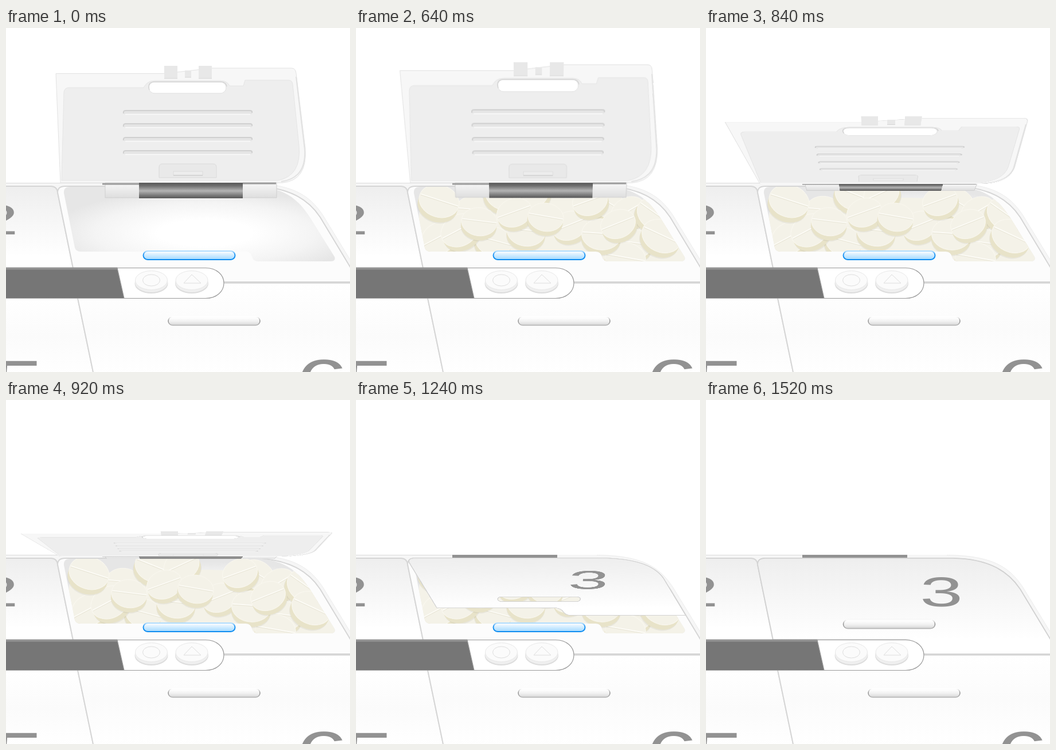
Recreate the animation shown at these times as an HTML page. Size 600x600 px, loop 1920 ms.

```html
<!DOCTYPE html>
<html lang="en">
<head>
<meta charset="utf-8">
<title>Pill box</title>
<style>
  html, body { margin: 0; width: 100%; height: 100%; overflow: hidden; background: #fff; }
  #stage { position: fixed; inset: 0; overflow: hidden; contain: strict; }
  svg { position: absolute; left: 0; top: 0; width: 600px; height: 600px; }
  text { font-family: "Liberation Sans", Arial, sans-serif; fill: #929292; text-anchor: middle; }
  .edge { stroke: #d6d6d6; stroke-width: 2; }
  #inside, #lid { overflow: visible; }
  #inside { transform-origin: 295.7px 273.5px; }
  #lid { transform-origin: 317px 275px; }
</style>
</head>
<body>
<div id="stage">
<svg viewBox="0 0 600 600">
  <defs>
    <linearGradient id="cell" x2="0" y2="1">
      <stop stop-color="#eee"/><stop offset=".55" stop-color="#f9f9f9"/><stop offset=".85" stop-color="#fff"/>
    </linearGradient>
    <linearGradient id="lower" x2="0" y2="1">
      <stop stop-color="#fff"/><stop offset=".5" stop-color="#fbfbfb"/><stop offset="1" stop-color="#fff"/>
    </linearGradient>
    <linearGradient id="button" x2="0" y2="1">
      <stop offset=".1" stop-color="#fff"/><stop offset=".55" stop-color="#f1f1f1"/><stop offset="1" stop-color="#d6d6d6"/>
    </linearGradient>
    <linearGradient id="rim" x2="0" y2="1">
      <stop stop-color="#fff"/><stop offset=".5" stop-color="#909090"/><stop offset="1" stop-color="#b4b4b4"/>
    </linearGradient>
    <linearGradient id="blue" x2="0" y2="1">
      <stop offset=".1" stop-color="#f6fbff"/><stop offset="1" stop-color="#a0d8ff"/>
    </linearGradient>
    <linearGradient id="blueRim" x2="0" y2="1">
      <stop stop-color="#b5dfff"/><stop offset=".4" stop-color="#2196f3"/><stop offset="1" stop-color="#0f8df0"/>
    </linearGradient>
    <linearGradient id="metal" x2="0" y2="1">
      <stop stop-color="#555"/><stop offset=".2" stop-color="#707070"/><stop offset=".52" stop-color="#b4b4b4"/>
      <stop offset=".8" stop-color="#7c7c7c"/><stop offset="1" stop-color="#565656"/>
    </linearGradient>
    <linearGradient id="block" x2="0" y2="1">
      <stop stop-color="#f7f7f7"/><stop offset="1" stop-color="#dedede"/>
    </linearGradient>
    <radialGradient id="hollow" cx=".52" cy=".62" r=".58">
      <stop offset=".3" stop-color="#fff"/><stop offset=".7" stop-color="#f4f4f4"/><stop offset="1" stop-color="#e6e6e6"/>
    </radialGradient>
    <path id="tray" d="M101 288Q100 277 112 277H440C490 279 513 304 530 330L573 399Q576 407 566 407H440Q431 407 429 399Q427 390 418 390H130Q122 390 120 383Z"/>
    <clipPath id="trayClip"><use href="#tray"/></clipPath>
    <g id="pill">
      <ellipse cy="11" rx="35.500" ry="28" fill="#000" opacity=".05"/>
      <path d="M-35.500 0V9A35.500 28 0 0 0 35.500 9V0Z" fill="#e8e3c9"/>
      <ellipse rx="35.500" ry="28" fill="#f4f2e8" stroke="#faf8f0"/>
      <path d="M-34-2H34" stroke="#fdfcf7" stroke-width="2"/>
      <path d="M-34-.5H34" stroke="#e8e5d6"/>
    </g>
    <rect id="slot" width="160" height="15" rx="7.5"/>
    <g id="knob">
      <ellipse cy="6" rx="29" ry="17" fill="#dcdcdc"/>
      <ellipse cy="4" rx="28.500" ry="17" fill="#efefef"/>
      <ellipse rx="28" ry="16.500" fill="#fbfbfb" stroke="#e9e9e9"/>
    </g>
    <g id="groove">
      <rect width="226" height="7" rx="3.5" fill="#e5e5e5"/>
      <path d="M1 6Q0 1 5 1H221Q226 1 225 5" fill="none" stroke="#d0d0d0" stroke-width="2"/>
      <path d="M4 7.5H222" stroke="#fafafa" stroke-width="1.5"/>
    </g>
  </defs>

  <path d="M-5 270H420C500 271 530 292 553 327L605 412V605H-5Z" fill="#f6f6f6"/>
  <path d="M-5 270.5H168" stroke="#dcdcdc"/>
  <path d="M420 270.5C500 271 530 292 553 327L605 412" fill="none" stroke="#ececec"/>
  <path class="edge" d="M-5 276H78Q89 276 90 287L117 419H-5Z" fill="url(#cell)"/>
  <path class="edge" d="M90 287Q90 276 103 276H430C495 277 528 300 548 330L616 443H340V419H117Z" fill="#fcfcfc"/>
  <path class="edge" d="M-5 471H125L153 605H-5Z" fill="url(#lower)"/>
  <path class="edge" d="M125 471L153 605H610V444H340V471Z" fill="url(#lower)"/>
  <path d="M380 444H600" stroke="#d6d6d6" stroke-width="3.5"/>
  <text transform="translate(-16 360) scale(1.85 1)" font-size="74">2</text>
  <text transform="translate(21 655.500) scale(1.5 1)" font-size="110">5</text>
  <text transform="translate(551 655) scale(1.5 1)" font-size="110">6</text>
  <use href="#slot" x="283" y="503.500" fill="url(#button)" stroke="url(#rim)" stroke-width="1.5"/>

  <use href="#tray" fill="url(#hollow)"/>
  <g clip-path="url(#trayClip)"><g id="pills">
    <path d="M112 310L190 300L350 296L470 300L540 325L590 420H100Z" fill="#f4f2e8"/>
  </g></g>
  <use href="#slot" x="239.500" y="389" fill="url(#blue)" stroke="url(#blueRim)" stroke-width="2"/>
</svg>

<svg id="inside" viewBox="0 0 600 600">
  <path fill="#f7f7f7" stroke="#e2e2e2" fill-rule="evenodd"
    d="M87 79.5H276L359 70H498Q505 70 506 79L522 210Q526 266 482 270H95L92 200Z
       M259 94H374A10 10 0 0 1 374 114H259A10 10 0 0 1 259 94Z"/>
  <path fill="#eee" stroke="#e5e5e5" fill-rule="evenodd"
    d="M97 266L101 112Q102 104 110 104H240Q246 92 259 92H374Q386 92 390 101H414L417 91H493Q499 91 500 98L511 205Q516 258 474 266Z
       M259 94H374A10 10 0 0 1 374 114H259A10 10 0 0 1 259 94Z"/>
  <path d="M250 108Q246 94 259 94H374Q384 94 385 102" fill="none" stroke="#d5d5d5" stroke-width="1.5"/>
  <path d="M506 85L521 212Q524 262 480 268" fill="none" stroke="#e2e2e2" stroke-width="2"/>
  <path d="M276 66H299V88H276ZM336 66H359V88H336ZM312 74H323V86H312Z" fill="#e8e8e8"/>
  <path d="M276 88H299M336 88H359M312 86H323" stroke="#d6d6d6"/>
  <use href="#groove" x="204" y="143"/><use href="#groove" x="204" y="166"/>
  <use href="#groove" x="204" y="190"/><use href="#groove" x="204" y="213"/>
  <path d="M267 261V243Q267 237 273 237H361Q367 237 367 243V261Z" fill="#e9e9e9" stroke="#dadada"/>
  <path d="M292 250H343V257H292Z" fill="#ededed" stroke="#dcdcdc"/>
  <path d="M292 257H343" stroke="#d0d0d0" stroke-width="1.5"/>
  <path d="M173 270H472V296H173Z" fill="url(#block)" stroke="#cfcfcf"/>
  <path d="M168 272H232M413 271H471" stroke="#9c9c9c" stroke-width="3"/>
  <path d="M232 270H413V297H232Z" fill="url(#metal)"/>
</svg>

<svg id="lid" viewBox="0 0 600 600">
  <path fill="url(#cell)" stroke="#d2d2d2" stroke-width="1.6" fill-rule="evenodd"
    d="M90 287Q90 276 103 276H430C495 277 528 300 548 330L616 443H384Q374 443 368 431Q362 418 348 418H117Z
       M247 383.5H392A7.5 7.5 0 0 1 392 398.5H247A7.5 7.5 0 0 1 247 383.5Z"/>
  <text transform="translate(410.5 360) scale(1.85 1)" font-size="73">3</text>
  <use id="latch" href="#slot" x="239.500" y="383.500" fill="url(#button)" stroke="url(#rim)" stroke-width="1.5"/>
</svg>

<svg viewBox="0 0 600 600">
  <path id="hinge" d="M168 270H351V275H168Z" fill="#929292"/>
  <path d="M-5 418H194L206 471.5H-5Z" fill="#767676"/>
  <path d="M-5 419.5H194.5" stroke="#929292" stroke-width="4"/>
  <path d="M194 418.500H348C368 418.500 380 431 380 445S368 471.500 348 471.500H206Z" fill="#fff" stroke="#999" stroke-width="1.2"/>
  <use href="#knob" x="253.500" y="440"/><use href="#knob" x="324" y="440"/>
  <g fill="none" stroke="#dedede">
    <ellipse cx="253.500" cy="440" rx="15" ry="10"/>
    <path d="M324 430L340 445H310Z"/>
  </g>
</svg>
</div>

<script>
const $ = id => document.getElementById(id);
const [pills, inside, lid, latch, hinge] = ["pills", "inside", "lid", "latch", "hinge"].map($);

// x, y, tilt in degrees, scale; back to front
const heap = [
  [205, 318, 5, .88], [258, 291, 22, .95], [306, 289, -25, .9], [438, 305, 30, .88], [475, 321, -30, .9],
  [522, 325, 35, .95], [240, 372, 15, .9], [146, 366, -28, .95], [485, 376, 8, .9], [470, 402, 10, 1],
  [297, 354, 6, .95], [372, 345, -22, .88], [428, 360, 4, .97], [181, 353, -28, .97], [145, 302, 18, 1],
  [408, 302, -20, .88], [276, 322, -20, .88], [215, 338, 7, .88], [331, 330, 10, .88],
  [457, 342, -22, .88], [533, 363, 25, 1]
];
for (const [x, y, tilt, scale] of heap) {
  const use = document.createElementNS("http://www.w3.org/2000/svg", "use");
  use.setAttribute("href", "#pill");
  use.setAttribute("transform", `translate(${x} ${y}) rotate(${tilt}) scale(${scale})`);
  pills.append(use);
}

const LOOP = 1920, STEP = 40, FLIP = 1000, CLOSED = 1520;
const progress = (t, from, to) => Math.min(1, Math.max(0, (t - from) / (to - from)));
const ease = (t, from, to) => (1 - Math.cos(Math.PI * progress(t, from, to))) / 2;
const swing = (depth, angle) => `perspective(${depth}px) rotateX(${-angle}deg)`;
const show = (el, on) => { el.style.display = on ? "" : "none"; };

function draw(now) {
  const t = Math.floor(now % LOOP / STEP) * STEP;
  const closed = t >= CLOSED;
  pills.style.opacity = progress(t, 280, 480);
  inside.style.transform = swing(846, 90 * ease(t, 520, 1025));
  lid.style.transform = closed ? "none" : swing(760, 90 - 90 * ease(t, 925, 1565));
  show(inside, t < FLIP);
  show(lid, t >= FLIP);
  show(hinge, t >= FLIP);
  show(latch, closed);
  requestAnimationFrame(draw);
}
draw(0);
</script>
</body>
</html>
```
